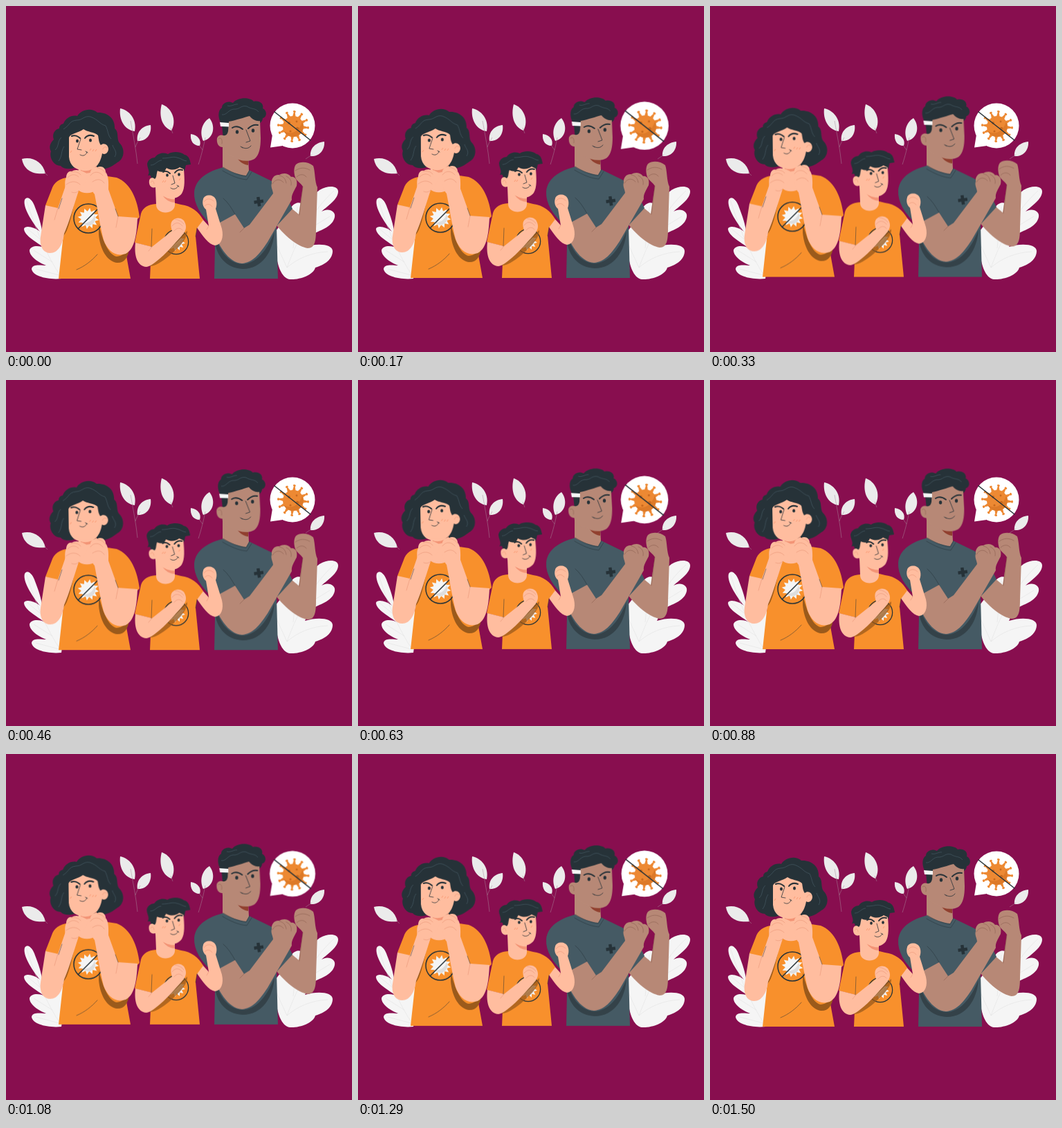
Animation of 500x500 px, one loop 1540 ms. Source, as an HTML page:

```html
<!DOCTYPE html>
<html lang="en">
<head>
<meta charset="utf-8">
<title>Ready to fight</title>
<style>
html, body { margin: 0; width: 100%; height: 100%; overflow: hidden; background: #880e4f; }
svg { display: block; width: 100%; height: 100%; }
.bob { animation: bob 1540ms cubic-bezier(.35,.15,.65,1) infinite; }
.head { animation: tilt 1540ms cubic-bezier(.35,.15,.65,1) infinite; }
.bubble { transform-origin: 414px 173px; animation: beat 513.33ms ease-in-out infinite; }
@keyframes bob { 50% { transform: translateY(-5.5px); } }
@keyframes tilt { 50% { transform: rotate(-1.2deg); } }
@keyframes beat { 0%, 66%, 100% { transform: scale(1); } 33% { transform: scale(1.07); } }
.line { fill: none; stroke: #263238; stroke-width: .8; stroke-linecap: round; stroke-linejoin: round; }
.seam { stroke-width: .5; }
.brow { stroke-width: 2; }
.slash { stroke-width: 1.5; }
.dark { fill: #263238; }
.lock { fill: none; stroke: #455a64; stroke-width: .7; }
.skin { fill: #ffbd9f; }
.fold { fill: none; stroke: #e58f70; stroke-width: .5; stroke-linecap: round; }
.brown { fill: #b78876; }
.brown-fold { fill: none; stroke: #85594b; stroke-width: .5; stroke-linecap: round; }
.orange { fill: #f8902c; }
.slate { fill: #455a64; }
.shade { fill: #9b5a1b; }
.leaf { fill: #ebebeb; }
.bush { fill: #f5f5f5; }
.vein { fill: none; stroke: #dedede; stroke-width: .5; }
.stem { fill: none; stroke: #a9899b; stroke-width: .5; }
</style>
</head>
<body>
<svg viewBox="0 0 500 500">
<defs>
  <g id="spike"><path d="M-2.600-13L-.8-21H.8L2.600-13Z"/><rect x="-1.900" y="-23" width="3.800" height="2.800" rx="1.400"/></g>
  <g id="spikes4">
    <use href="#spike"/><use href="#spike" transform="rotate(90)"/>
    <use href="#spike" transform="rotate(180)"/><use href="#spike" transform="rotate(270)"/>
  </g>
  <g id="virus">
    <circle r="15"/>
    <use href="#spikes4" transform="rotate(5)"/><use href="#spikes4" transform="rotate(35)"/><use href="#spikes4" transform="rotate(65)"/>
  </g>
  <path id="ray" d="M-3.500-8L0-15.500L3.500-8Z"/>
  <g id="rays4">
    <use href="#ray"/><use href="#ray" transform="rotate(90)"/>
    <use href="#ray" transform="rotate(180)"/><use href="#ray" transform="rotate(270)"/>
  </g>
  <g id="badge">
    <g fill="#f5f5f5">
      <circle r="10.500"/>
      <use href="#rays4" transform="rotate(8)"/><use href="#rays4" transform="rotate(38)"/><use href="#rays4" transform="rotate(68)"/>
    </g>
    <path d="M9-5A10.500 10.500 0 0 1-8 7Q5 7 9-5Z" fill="#dedede"/>
    <circle class="line slash" r="21"/>
    <path class="line slash" d="M-14.500 14.500L14.500-14.500"/>
  </g>
</defs>
<rect width="500" height="500" fill="#880e4f"/>

<g>
  <path class="leaf" d="M165 148C177 150 190 163 186 181C171 179 163 164 165 148ZM209 172C211 185 203 196 190 195C188 181 198 173 209 172ZM225 142C238 146 248 164 239 180C224 174 221 157 225 142ZM294 162C303 173 301 191 285 195C279 181 284 168 294 162ZM267 185C277 186 283 194 280 202C270 202 266 194 267 185ZM460 196C461 209 452 218 440 217C439 205 448 197 460 196ZM23 221C38 217 53 225 57 242C40 244 26 238 23 221Z"/>
  <path class="stem" d="M180 166C184 188 188 208 190 228M194 190C191 195 188 200 187 204M238 176L241 184M288 190C285 205 282 217 278 229M279 201L284 208M442 215L433 221M55 240L60 245"/>
  <path class="bush" d="M80 394C60 396 38 390 37 380C38 372 52 375 58 375C46 370 34 362 34 353C36 345 50 346 56 350C46 342 26 332 26 322C28 316 42 320 49 326C36 310 24 290 27 280C31 273 39 281 42 291C47 304 51 315 53 330L88 335Z"/>
  <path class="vein" d="M30 282C42 320 57 358 80 392M31 322L59 345M40 353L67 370M43 380L77 389"/>
  <path class="bush" d="M386 330L408 302C410 288 420 282 426 285C430 287 430 291 428 297C436 284 444 273 453 266C466 258 480 260 480 268C480 279 466 288 456 297C465 291 477 296 475 305C472 319 456 323 443 330C437 336 435 342 432 348C450 342 472 344 472 354C472 366 461 374 447 378C444 389 424 396 410 395C398 393 392 375 390 355Z"/>
  <path class="vein" d="M474 267C445 293 423 332 406 378M468 304L430 327M465 355C441 356 421 365 406 378L391 345M421 290L415 350"/>
</g>

<g class="bubble">
  <circle cx="414" cy="173" r="32.500" fill="#fff"/>
  <path d="M385 186L382 204.500L400 202Z" fill="#fff"/>
  <g transform="translate(415 174)">
    <use href="#virus" fill="#ed8933"/>
    <path d="M13-7A15 15 0 1 1-14 6C-6 13 8 10 13-7Z" fill="#dd7a28"/>
    <g fill="#c7691f"><circle cx="-6" cy="-5" r="2"/><circle cx="5" cy="-7" r="1.400"/><circle cx="6" cy="3" r="2.200"/><circle cx="-4" cy="7" r="1.500"/></g>
  </g>
  <path class="line slash" d="M388 153L440 194"/>
</g>

<g class="bob">
  <!-- man -->
  <path class="brown" d="M386 310C401 332 422 348 436 350C447 350 448 338 448 322L450 262C446 254 447 240 444 231C437 225 425 224 419 229C415 234 416 244 419 250C422 254 426 256 429 261L423 301L411 291Z"/>
  <path class="brown-fold" d="M418 238C425 233 432 233 439 237M420 247C425 242 431 243 434 247M429 261L424 302"/>
  <path class="slate" d="M314 233C292 239 274 249 272 269C271 286 281 302 300 320L302 345L301 394H393L391 318L414 293C405 274 398 259 382 252L351 237Z"/>
  <path d="M302 328C306 352 322 372 341 373C361 373 377 354 388 326C386 354 371 380 342 380C318 379 304 361 302 340Z" fill="#344249"/>
  <path class="brown" d="M313 195V233C323 239 336 244 347 245L351 238L350 218Z"/>
  <path d="M332 216C337 220 344 223 350 223L350 230C342 229 336 224 332 216Z" fill="#91402f"/>
  <path class="line seam" d="M314 233C325 240 337 245 347 246L352 237M313 238C325 245 336 250 348 251L355 240"/>
  <path class="dark" transform="rotate(-8 365 283)" d="M363 276h4.500v4.500h4.500v4.500h-4.500v4.500H363v-4.500h-4.500v-4.500h4.500Z"/>
  <path class="brown" d="M298 319C305 344 321 371 341 372C356 371 366 359 378 341L413 280C412 273 416 268 420 260C422 251 417 246 412 247C408 241 400 241 395 244C388 243 383 249 384 256C382 261 386 267 386 271L352 316L344 321L331 301Z"/>
  <path class="brown-fold" d="M385 257C389 250 396 249 401 255M395 245C401 246 404 250 405 256M405 246C411 249 413 253 412 259M344 321L338 327"/>
  <path class="line seam" d="M331 301C326 292 321 284 314 278"/>
  <g class="head" style="transform-origin:330px 230px">
    <path class="dark" d="M314 189C312 181 314 174 309 166C306 158 307 150 312 147C312 140 321 136 328 140C334 132 352 131 358 138C367 136 373 142 371 148C378 151 377 161 371 162C371 165 369 168 366 170L320 187Z"/>
    <path class="brown" d="M314 187C317 188 320 186 321 181L322 167C333 165 344 161 352 159C356 164 362 167 367 166L368 191C368 204 366 216 359 221C350 226 337 224 328 218C320 216 314 210 313 204C307 204 304 198 305 191C307 186 311 186 314 187Z"/>
    <path d="M309 168L322 169V174.500L310 174Z" fill="#f5f5f5"/>
    <path class="lock" d="M312 157C319 158 321 150 329 149C338 150 339 143 348 145C356 150 360 147 365 153M320 144C325 146 331 141 335 142"/>
    <path class="brown-fold" d="M307 192C311 189 313 193 312 199"/>
    <ellipse class="dark" cx="334" cy="182" rx="2.200" ry="2.700"/><ellipse class="dark" cx="357" cy="180" rx="2.200" ry="2.700"/>
    <path class="line brow" d="M327 176C332 173 338 175 342 178M350 177C354 173 359 171 364 172"/>
    <path class="line" d="M347 179L353 195L347 197M341 204C346 207 351 206 354 202M339 203L342 205"/>
  </g>

  <!-- woman -->
  <g class="head" style="transform-origin:115px 238px">
    <path class="dark" d="M83 170C86 162 95 157 103 159C108 150 123 146 132 154C147 153 158 163 157 177C164 182 159 193 165 199C173 208 170 222 161 226C156 230 148 235 139 236L99 234C92 236 83 236 79 231C68 231 62 218 65 210C61 203 65 197 69 193C66 185 71 178 77 177C77 173 79 171 83 170Z"/>
    <path class="lock" d="M83 178C93 172 91 166 102 165C111 165 113 158 122 160C135 165 134 170 144 173C148 181 147 187 152 192M71 208C77 203 74 195 80 190M76 224C82 216 79 210 84 203M157 218C162 211 155 206 154 201"/>
    <path class="skin" d="M91 190C93 184 104 184 112 178C117 182 128 182 133 187C134 192 134 197 137 201C141 197 148 200 148 207C147 214 142 215 139 213C137 225 131 237 116 238C101 238 92 231 91 218Z"/>
    <path d="M121 209L123 206M125 210L127 207M129 210L131 207M93 212L95 209" stroke="#f88c62" stroke-width=".7"/>
    <ellipse class="dark" cx="103" cy="195" rx="2" ry="2.500"/><ellipse class="dark" cx="122" cy="194" rx="2" ry="2.500"/>
    <path class="line brow" d="M95 188C99 186 104 188 107 191M114 191C117 187 122 186 127 188"/>
    <path class="line" d="M108 192L103 207L109 208M107 215C112 218 116 215 117 211M115 210L118 212"/>
    <path class="fold" d="M140 207C141 203 144 203 146 205"/>
  </g>
  <path class="orange" d="M92 247C77 249 69 255 66 265L57 288L82 304L83 330L76 394H180L172 350L186 312L193 305C190 281 181 256 160 248L140 245Z"/>
  <path class="shade" d="M103 265C98 287 94 310 88 324C86 329 83 331 82 336L88 272ZM134 315C139 337 148 360 160 362C168 361 174 357 178 350C177 364 170 372 160 371C146 369 136 352 134 330Z"/>
  <path class="skin" d="M105 234H131V265C124 272 110 272 103 265Z"/>
  <path d="M108 237C116 240 125 237 131 231V236C125 242 114 243 108 240Z" fill="#f39476"/>
  <path class="line seam" d="M102 381C114 376 124 368 132 359M146 262L151 285"/>
  <use href="#badge" x="119" y="307"/>
  <path class="skin" d="M57 288L50 333C48 346 53 357 64 357C75 357 82 345 84 329C92 311 98 288 105 267C111 262 119 250 118 243C110 237 100 235 95 239C90 238 87 243 87 248C84 253 86 260 85 263L75 292Z"/>
  <path class="skin" d="M190 306C189 327 187 351 173 358C158 363 147 354 141 338C136 318 132 292 128 272C124 268 120 257 122 245C120 237 127 232 132 233C138 230 144 234 144 240C149 246 148 258 148 265L162 304Z"/>
  <path class="fold" d="M89 248C95 242 101 243 105 247M94 240C100 239 105 240 108 244M87 258C95 252 102 253 107 258M95 269C100 271 103 269 105 267M122 245C127 238 135 239 140 245M132 234C138 235 142 238 144 242M125 254C132 249 138 250 142 256M162 304L159 320M75 292L70 309"/>
  <path class="line seam" d="M76 293L81 278M162 304L158 293"/>

  <!-- boy -->
  <path class="skin" d="M275 319C284 332 293 345 302 346C311 345 315 335 312 322L303 293C306 286 304 277 299 275C294 272 286 274 285 279C283 285 285 291 289 294L293 318L284 308Z"/>
  <path class="fold" d="M286 283C290 277 296 278 300 282M287 289C291 285 295 286 298 290M293 318L290 323"/>
  <path class="orange" d="M217 286C205 287 198 291 195 300L186 342L210 348L208 394H280L274 333L276 321L285 309C278 297 268 289 253 287L241 284Z"/>
  <use href="#badge" transform="translate(246 341) scale(.84)"/>
  <path class="shade" opacity=".75" d="M211 364C230 352 250 336 262 325C262 338 248 350 236 361C224 371 213 377 207 376Z"/>
  <path class="skin" d="M216 262L217 287C217 302 243 302 244 288V269Z"/>
  <path d="M226 273C231 278 239 280 244 279V284C237 284 230 280 226 273Z" fill="#f39476"/>
  <path class="skin" d="M187 342C185 360 189 376 203 377C214 376 239 350 257 328C262 321 260 315 257 310C252 305 245 306 242 309C237 312 238 319 240 325L211 348Z"/>
  <path class="fold" d="M240 318C245 311 251 313 255 318M244 308C250 309 254 311 257 315M243 325C247 320 252 320 255 324M211 348L206 354"/>
  <path class="line seam" d="M210 348L211 322M274 333L276 321"/>
  <g class="head" style="transform-origin:230px 281px">
    <path class="dark" d="M211 250C208 247 211 243 205 245C209 239 204 235 204 228C205 222 211 219 215 219C219 213 227 211 234 214C242 209 253 211 258 215C264 216 266 222 267 229L260 230L258 238L216 254Z"/>
    <path class="skin" d="M215 250C218 248 217 243 219 238C222 240 226 240 229 239L232 234C239 238 246 237 251 233L257 236C258 250 259 263 254 271C248 279 238 280 228 275C222 272 218 268 216 262C209 264 206 258 207 252C208 248 212 247 215 250Z"/>
    <path class="lock" d="M209 230C216 230 219 223 225 223M226 220C237 220 240 217 247 219C253 220 257 224 261 224"/>
    <path class="fold" d="M209 255C211 251 214 253 214 257"/>
    <path d="M226 255L228 252M229 255L231 252M250 252L252 249" stroke="#f88c62" stroke-width=".7"/>
    <ellipse class="dark" cx="233" cy="244.500" rx="1.800" ry="2.200"/><ellipse class="dark" cx="250" cy="243.500" rx="1.800" ry="2.200"/>
    <path class="line brow" d="M227 240C230 238 234 239 237 242M244 241C247 237 251 236 255 237"/>
    <path class="line" d="M241 245L244 256L239 258M238 263C242 266 247 264 249 260M247 259L250 261"/>
  </g>
</g>
</svg>
</body>
</html>
```
